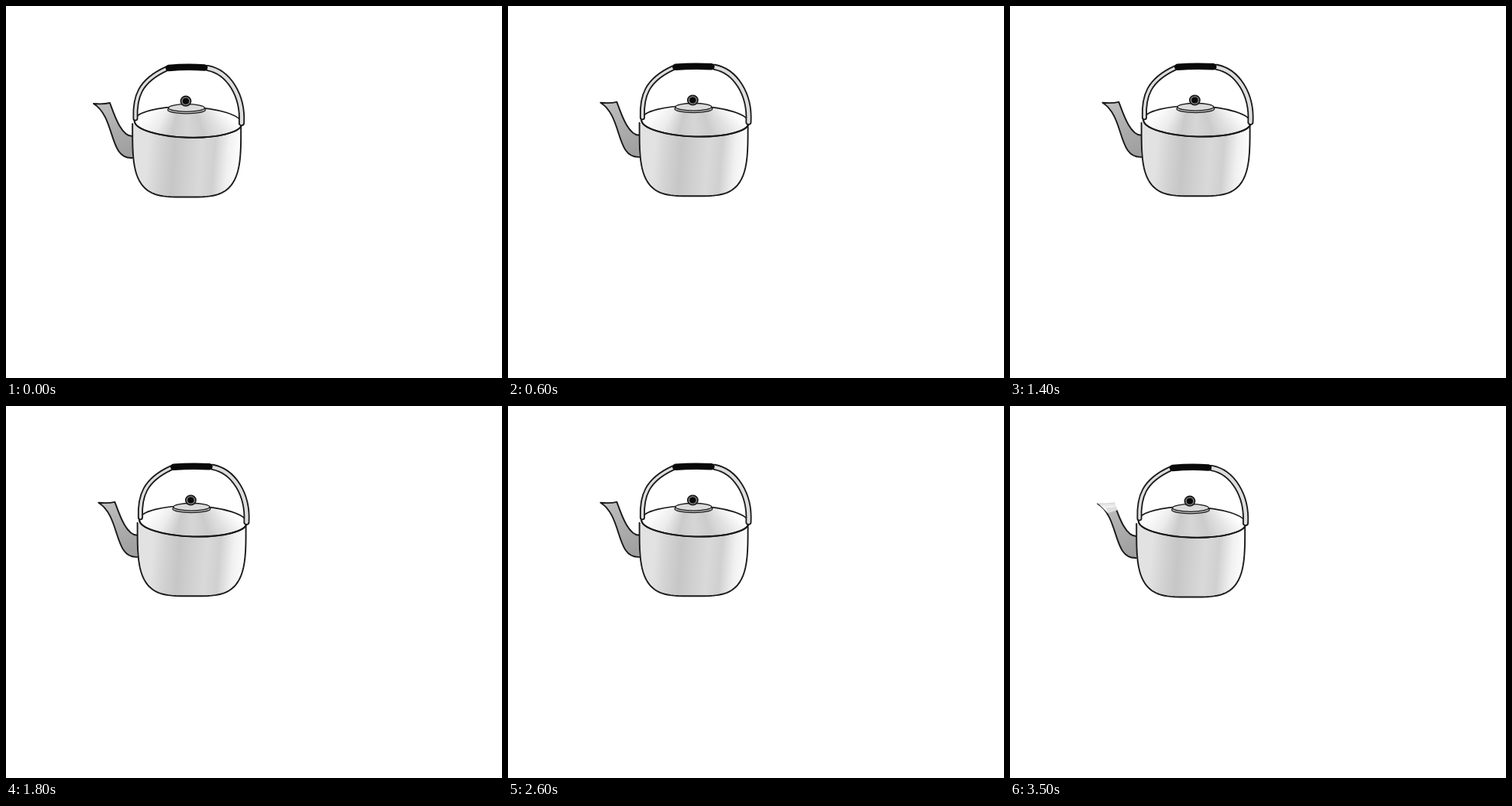
An HTML page with a canvas for the animation above (4.9 s loop, 640 by 480 pixels).

```html
<!DOCTYPE html>
<html>
<head>
<meta charset="utf-8">
<style>
html, body { margin: 0; width: 100%; height: 100%; overflow: hidden; background: #fff; }
canvas { display: block; }
</style>
</head>
<body>
<canvas id="stage" width="640" height="480"></canvas>
<script>
const ctx = document.getElementById('stage').getContext('2d');
const LOOP = 4900, BEAT = 200, STEAM_AT = 3200, STEAM_STEP = 100;
const INK = '#1a1a1a';

const grey = v => `rgb(${v},${v},${v})`;

// Spreads grey levels evenly over part of a gradient.
function tones(gradient, levels, from = 0, to = 1) {
  levels.forEach((v, i) => gradient.addColorStop(from + (to - from) * i / (levels.length - 1), grey(v)));
  return gradient;
}

function fill(path, style) {
  ctx.fillStyle = style;
  ctx.fill(path);
}

function stroke(path, width = 1.9, style = INK) {
  ctx.lineWidth = width;
  ctx.strokeStyle = style;
  ctx.stroke(path);
}

function oval(x, y, rx, ry, tilt = 0, from = 0, to = Math.PI * 2) {
  const path = new Path2D();
  path.ellipse(x, y, rx, ry, tilt, from, to);
  return path;
}

// Lower half of a superellipse: straight sides, rounded bottom corners.
function bowl(x, y, rx, ry, power) {
  const path = new Path2D(), round = v => Math.sign(v) * Math.abs(v) ** (2 / power);
  for (let i = 0; i <= 60; i++) {
    const a = Math.PI * i / 60;
    path.lineTo(x + rx * round(Math.cos(a)), y + ry * round(Math.sin(a)));
  }
  return path;
}

const wall = bowl(233.2, 152, 70, 94.5, 3.7);
const rim = oval(235, 150, 69.3, 19.7, 0.03);
const rimFront = oval(235, 150, 69.3, 19.7, 0.03, 0, Math.PI);
const spoutShape = new Path2D('M163 168C148 168 139 138 134 125Q126 127 113 126C142 144 132 198 163 196');
const leftArm = new Path2D('M167 145C166 118 172 97 207 81');
const rightArm = new Path2D('M260 80C287 85 306 115 304 151');
const grip = new Path2D('M210 80Q233 78 256 79.5');
const mist = new Path2D('M111 123L138 123L139 134L126 138Z');
const mistEdge = new Path2D('M124 131L137 130L139 134L126 138Z');

function spout() {
  fill(spoutShape, tones(ctx.createLinearGradient(128, 130, 156, 190), [188, 172, 160]));
  stroke(spoutShape);
}

function body() {
  const side = tones(ctx.createLinearGradient(165, 190, 303, 201), [226, 226, 210, 198, 208, 217, 208, 240, 255]);
  fill(wall, side);
  fill(rim, side);
  // The dome's sheen fans out from above the lid.
  fill(rim, tones(ctx.createConicGradient(0, 232, 95), [255, 226, 204, 214, 203, 236, 252], 0.11, 0.38));
  stroke(wall);
  stroke(rim, 1.7);
  stroke(rimFront, 2);
}

function lid() {
  for (const [y, rx, tone] of [[134, 24.3, 198], [131.5, 23.3, 218]]) {
    const plate = oval(233, y, rx, 4.8);
    fill(plate, grey(tone));
    stroke(plate, 1.3);
  }
  const knob = oval(232, 122.7, 6.5, 6.2);
  fill(knob, grey(140));
  stroke(knob, 1.8);
  fill(oval(232, 122.7, 4.2, 4), grey(8));
}

function handle() {
  for (const [arm, width] of [[leftArm, 7], [rightArm, 8]]) {
    stroke(arm, width);
    stroke(arm, width - 3.6, grey(221));
  }
  stroke(grip, 8.5, grey(9));
}

// Pale vapour over the spout tip; amount runs from 0 to 1.
function steam(amount) {
  ctx.save();
  ctx.globalAlpha = amount;
  fill(mist, 'rgba(255,255,255,.87)');
  fill(mistEdge, grey(222));
  for (let i = 0; i < 3; i++) {
    const y = 125.5 + i * 2;
    stroke(new Path2D(`M${113 + i * 4} ${y}Q124 ${y + 2} 135 ${y}`), 1.5, grey(220 + i * 10));
  }
  ctx.restore();
}

function draw(t) {
  const shaken = t < STEAM_AT && Math.floor(t / BEAT) % 2 === 1;
  const puff = Math.max(0, Math.min(3, Math.floor((t - STEAM_AT) / STEAM_STEP))) / 3;
  ctx.fillStyle = '#fff';
  ctx.fillRect(0, 0, 640, 480);
  ctx.save();
  ctx.lineCap = ctx.lineJoin = 'round';
  if (shaken) ctx.translate(6.4, -1.2);
  spout();
  body();
  lid();
  handle();
  if (puff) steam(puff);
  ctx.restore();
}

const start = performance.now();
function tick() {
  draw((performance.now() - start) % LOOP);
  requestAnimationFrame(tick);
}
tick();
</script>
</body>
</html>
```
